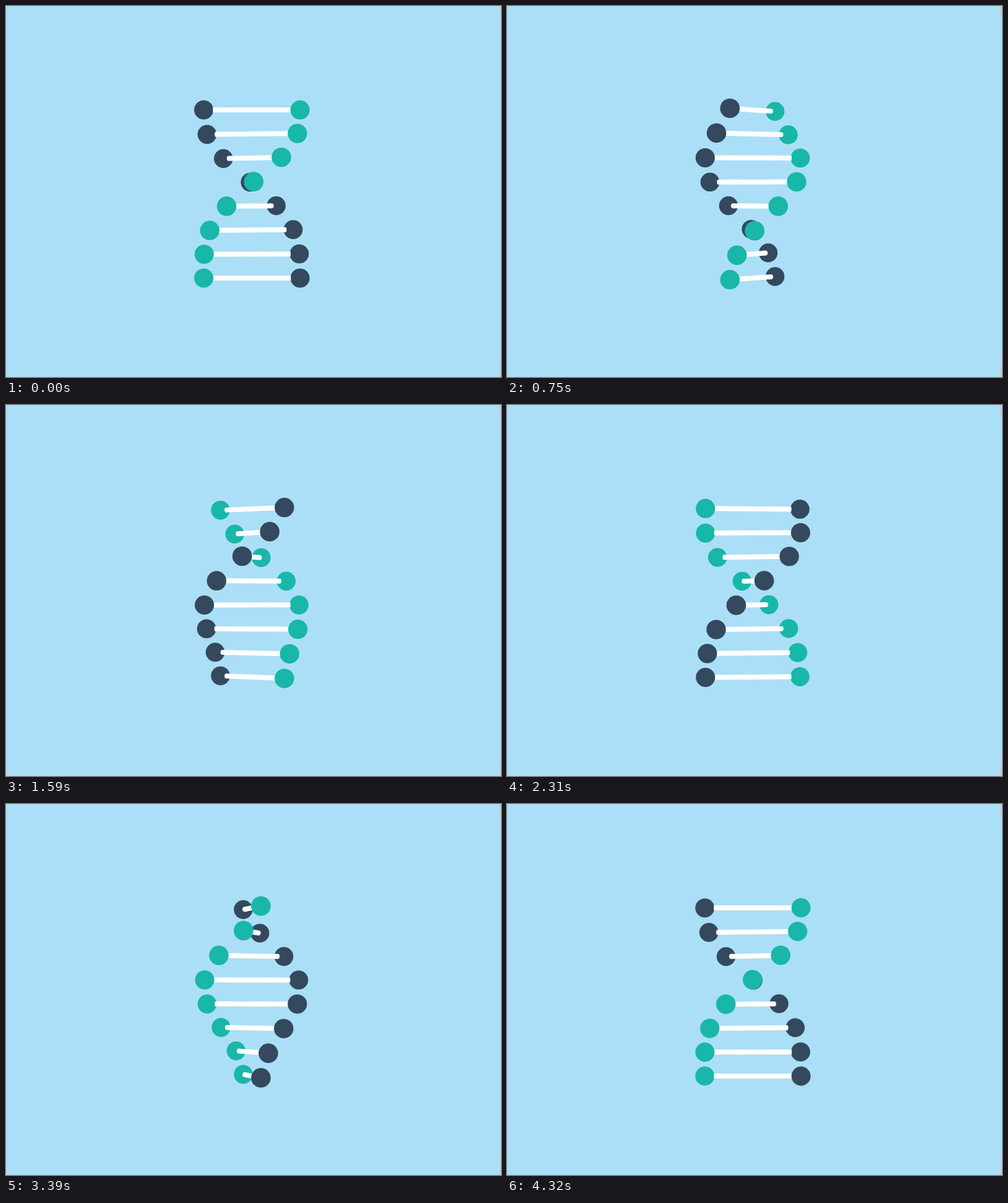
Recreate the animation shown at these times as an HTML page with a canvas. Size 800 px wide and 600 px high, loop 4.35 s.

```html
<!DOCTYPE html>
<html lang="en">
<head>
<meta charset="utf-8">
<title>Turning helix</title>
<style>
html, body { margin: 0; width: 100%; height: 100%; overflow: hidden; background: #abdff7; }
canvas { display: block; }
</style>
</head>
<body>
<canvas id="stage" width="800" height="600"></canvas>
<script>
const ctx = document.getElementById('stage').getContext('2d');
const LOOP = 4350, STEP = 30;
const CX = 397.4, CY = 304, GAP = 38.86;
const ARM = 77.8, BAR = 63, BALL = 15.5, THICK = 4, DEPTH = 0.021;
const SKY = '#abdff7', DARK = '#34495e', TEAL = '#18b7a8', EDGE = '#c9cac1';
const twist = [0, 20.3, 53, 87.9, 121, 150, 171, 180];

// Perspective view of a point on a rung, at a signed distance from the axis
function project(dist, angle, y) {
  const scale = 1 / (1 - DEPTH * Math.sin(angle) * dist / ARM);
  return { x: CX - dist * Math.cos(angle) * scale, y: CY + y * scale, scale };
}

function ball(p, color) {
  ctx.fillStyle = color;
  ctx.beginPath();
  ctx.arc(p.x, p.y, BALL * p.scale, 0, 2 * Math.PI);
  ctx.fill();
}

// A cylinder: straight body with a foreshortened round end at the back
function bar(back, front, sin) {
  ctx.strokeStyle = ctx.fillStyle = '#fff';
  ctx.lineWidth = 2 * THICK;
  ctx.beginPath();
  ctx.moveTo(back.x, back.y);
  ctx.lineTo(front.x, front.y);
  ctx.stroke();
  const tilt = Math.atan2(front.y - back.y, front.x - back.x);
  ctx.beginPath();
  ctx.ellipse(back.x, back.y, THICK * Math.abs(sin), THICK, tilt, 0, 2 * Math.PI);
  ctx.fill();
}

function rung(angle, y) {
  const sin = Math.sin(angle);
  const side = sin > 0 ? 1 : -1;
  const at = dist => project(dist * side, angle, y);
  ball(at(-ARM), side > 0 ? TEAL : DARK);
  bar(at(-BAR), at(BAR), sin);
  ball(at(ARM), side > 0 ? DARK : TEAL);
}

function corner(y, dir) {
  ctx.beginPath();
  ctx.moveTo(797.5, y);
  ctx.quadraticCurveTo(798, y + 18 * dir, 800, y + 30 * dir);
  ctx.lineTo(800, y);
  ctx.fill();
}

function draw(now) {
  const time = Math.floor((now % LOOP) / STEP) * STEP;
  ctx.fillStyle = SKY;
  ctx.fillRect(0, 0, 800, 600);
  ctx.fillStyle = EDGE;
  corner(0, 1);
  corner(600, -1);
  twist.forEach((lag, i) => {
    const degrees = 360 * time / LOOP - lag;
    rung(degrees * Math.PI / 180, (i - 3.5) * GAP);
  });
}

const start = performance.now();
function tick() {
  draw(performance.now() - start);
  requestAnimationFrame(tick);
}
tick();
</script>
</body>
</html>
```
